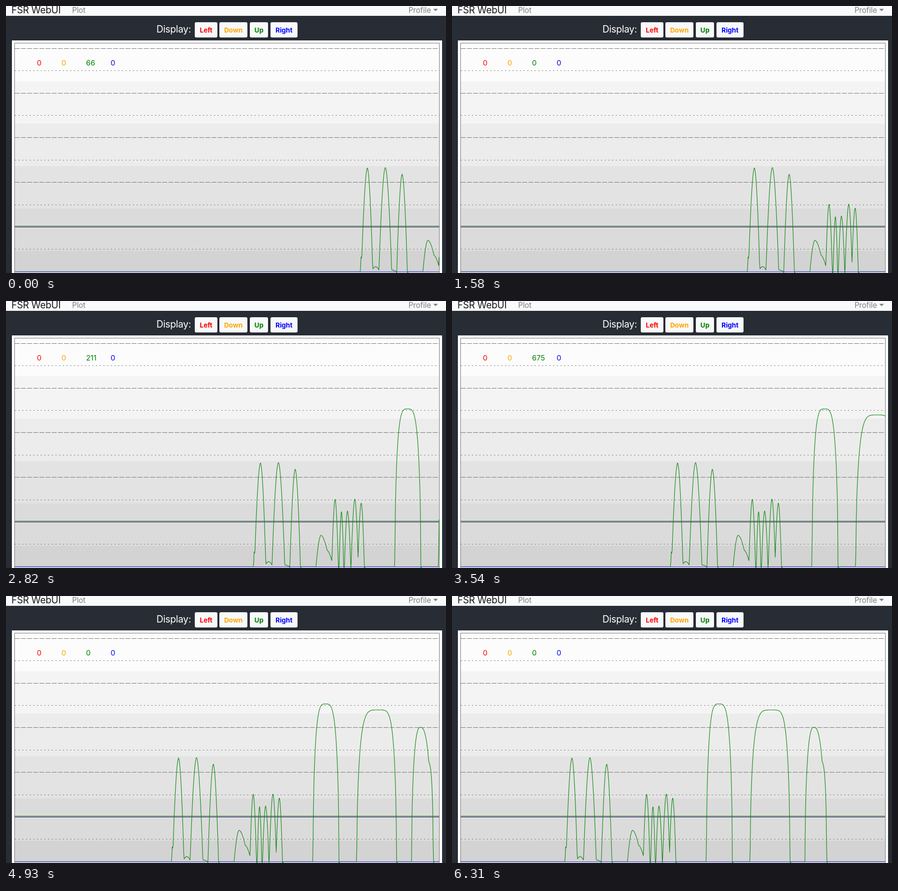
Write an HTML page that moves like this. It is 895 by 543 pixels and loops after 6410 ms.

```html
<!DOCTYPE html>
<html lang="en">
<head>
<meta charset="utf-8">
<title>Sensor plot</title>
<style>
html, body { margin: 0; width: 100%; height: 100%; overflow: hidden; background: #282c34; }
svg { display: block; font-family: Inter, Roboto, sans-serif; }
.big { font-size: 19.4px; letter-spacing: -.3px; }
.link { font-size: 15.2px; fill: #7c7d7d; letter-spacing: -.05px; }
.btn { font-size: 13.5px; font-weight: 700; text-anchor: middle; }
.num { font-size: 15px; }
</style>
</head>
<body>
<svg width="895" height="543" viewBox="0 0 895 543">
  <rect width="895" height="20" fill="#f9fafb"/>
  <text class="big" x="11" y="15" fill="#19191a">FSR WebUI</text>
  <text class="link" x="134.5" y="14">Plot</text>
  <text class="link" x="818.7" y="14">Profile</text>
  <path d="M869 5.7h9.6l-4.8 4.8z" fill="#7c7d7d"/>
  <text class="big" x="306" y="54" fill="#fff">Display:</text>
  <g id="buttons"></g>
  <rect x="12" y="70" width="875" height="480" fill="#fff"/>
  <g id="bands"></g>
  <g id="grid" fill="none" stroke="#777"><rect x="17.5" y="75.5" width="864" height="480"/></g>
  <path d="M18 447.5H881" stroke="#1f7f1f" stroke-width="1.2"/>
  <path d="M18 449.5H881" stroke="#1a0860" stroke-width="1.2"/>
  <path id="trace" fill="none" stroke="#0c860c" stroke-width="1.1" stroke-linejoin="round"/>
  <path d="M18 540.5H881" stroke="#3c3ce6" stroke-width="1.2"/>
  <g id="counters"></g>
</svg>
<script>
const $ = id => document.getElementById(id);
const LEFT = 18, DX = .863, SAMPLES = 1000, ZERO = 540.2, UNIT = .4537;

// Static parts
const sensors = [['Left', 'red', 384, 46], ['Down', 'orange', 434, 57],
                 ['Up', 'green', 496, 37], ['Right', 'blue', 538, 55]];
sensors.forEach(([name, color, x, w], i) => {
  $('buttons').innerHTML += `<rect x="${x}" y="33" width="${w}" height="31" rx="3" fill="#f8f9fa"/>
    <text class="btn" x="${x + w / 2}" y="54" fill="${color}">${name}</text>`;
  $('counters').innerHTML += `<text class="num" x="${62.7 + 50 * i}" y="121" fill="${color}">0</text>`;
});
const reading = $('counters').children[2];

for (let i = 0; i < 6; i++) {
  const y = i ? 67 + 86.2 * i : 76, v = Math.round(252 - 8.2 * i);
  $('bands').innerHTML += `<rect x="18" y="${y}" width="863" height="${550 - y}" fill="rgb(${v},${v},${v})"/>`;
}
for (let i = 1; i <= 10; i++) {
  const y = Math.floor(ZERO - i * 100 * UNIT) + .5;
  $('grid').innerHTML += `<path d="M18 ${y}H881" stroke-dasharray="${i % 2 ? '2.5 5' : '10 2.5'}"/>`;
}

// Presses as arches: start, peak, end, top, then the roundness of the shoulders
const soft = [
  [230, 231.5, 233, 508], [231.8, 244, 255, 329.5], [252, 261, 269, 530],
  [267.5, 280.5, 293.5, 328.5], [288, 294, 303, 537], [303.8, 314.7, 325.3, 342],
  [357, 367, 386, 476.5], [374, 379, 392, 507],
  [389.1, 395.8, 402.5, 403], [404.2, 408.7, 413.3, 428], [414.8, 421, 427.7, 427],
  [428.4, 436, 443, 402.5], [442, 449, 455.3, 410.5],
];
const firm = [
  [517.5, 543, 570.3, 219.5, 3.7], [606.5, 651, 687.3, 231.8, 4.8],
  [718, 736, 759, 267, 2.6], [720, 748, 762, 336, 4],
];
const pulses = [...soft.map(p => [...p, 1.8, 1]), ...firm.map(p => [...p, .5])];

function curve(x) {
  let height = 0, dip = 0;
  for (const [start, peak, end, top, power, root] of pulses) {
    const u = Math.abs(x - peak) / (x < peak ? peak - start : end - peak);
    if (u < 1) height = Math.max(height, (ZERO - top) * (1 - u ** power) ** root);
    if (x >= end && x < end + 1.5) dip = 3.3;   // rebound below zero
  }
  return ZERO - (height || -dip);
}

// Time, pictures shown and samples received; even steps in between
const keys = [[0, 0, 0], [1050, 14, 94], [2110, 29, 191], [3540, 48, 320],
              [4930, 66, 445], [5710, 77, 515], [6310, 85, 569], [6410, 86, 569]];
const [LOOP, , LAST] = keys.at(-1);
const data = Array.from({ length: SAMPLES + LAST + 1 }, (_, i) => curve(LEFT + DX * (i - LAST)));

function received(t) {
  const i = keys.findIndex(k => k[0] > t);
  const [t0, f0, n0] = keys[i - 1], [t1, f1, n1] = keys[i];
  const steps = f1 - f0, done = Math.floor((t - t0) / (t1 - t0) * steps);
  return Math.round(n0 + (n1 - n0) * done / steps);
}

function draw() {
  const n = received(performance.now() % LOOP);
  const view = data.slice(n, n + SAMPLES + 1);
  $('trace').setAttribute('d', 'M' + view.map((y, k) =>
    `${(LEFT + DX * k).toFixed(2)} ${y.toFixed(1)}`).join('L'));
  reading.textContent = Math.max(0, Math.round((ZERO - view[SAMPLES]) / UNIT));
  requestAnimationFrame(draw);
}
draw();
</script>
</body>
</html>
```
